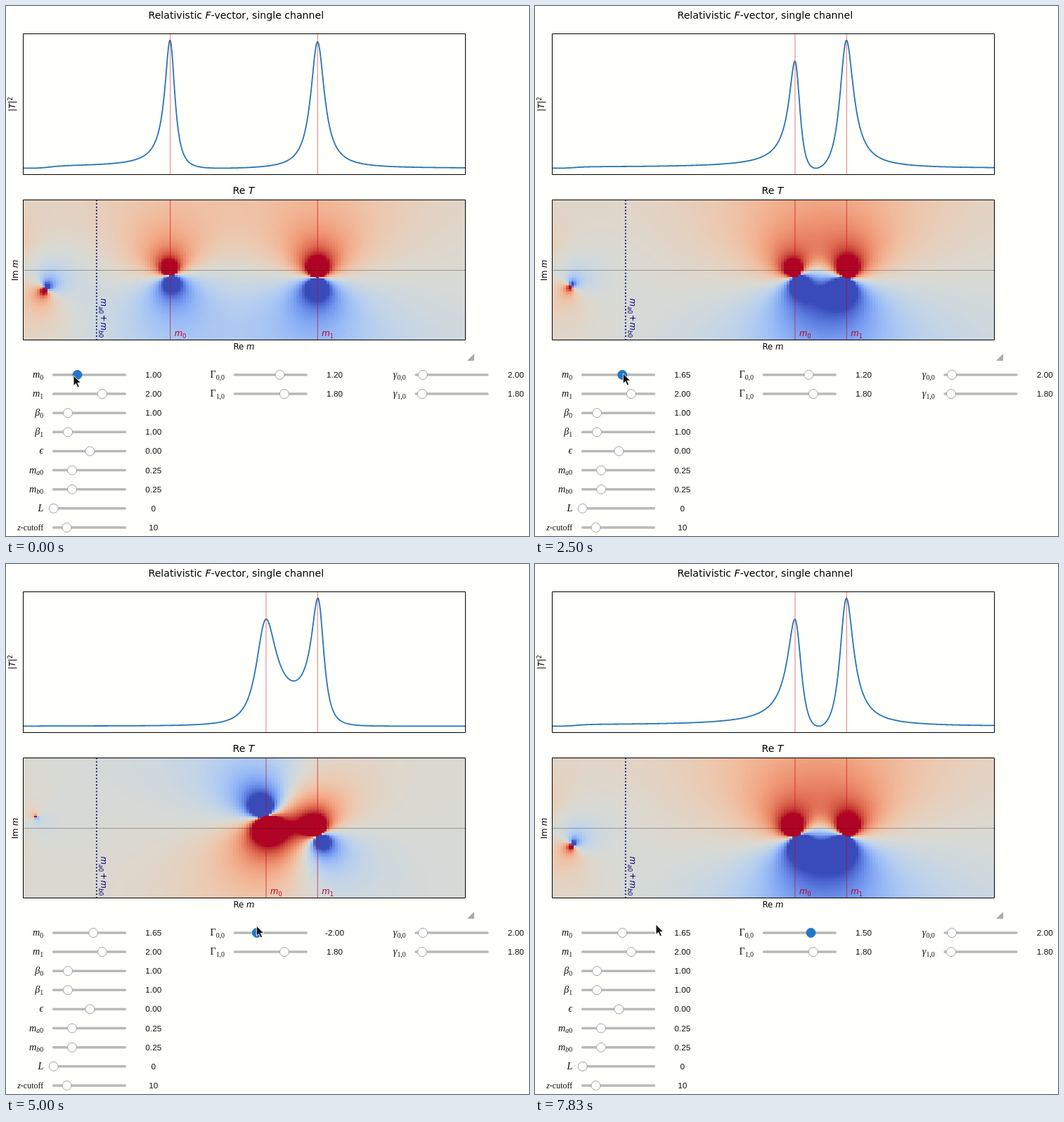
Recreate the animation shown at these times as an HTML page with a canvas. Size 744 px wide and 753 px high, loop 8000 ms.

```html
<!DOCTYPE html>
<html lang="en">
<head>
<meta charset="utf-8">
<title>F-vector explorer</title>
<style>
html, body { margin: 0; width: 744px; height: 753px; overflow: hidden; background: #fffffc; }
canvas, svg { position: absolute; left: 0; top: 0; }
text { white-space: pre; }
.plot { font-family: "DejaVu Sans", sans-serif; font-size: 11.75px; }
.title { font-size: 14.1px; }
.label { font-family: "Liberation Serif", serif; font-size: 14.2px; fill: #111; }
.value { font-family: "Liberation Sans", sans-serif; font-size: 11.8px; fill: #111; }
.it { font-style: italic; }
.sub { font-size: 70%; }
</style>
</head>
<body>
<canvas id="stage" width="744" height="753"></canvas>
<svg id="ui" width="744" height="753"></svg>
<script>
const LOOP = 8000;
const LEFT = 24, WIDTH = 629, TOP = 39.5, TOP_H = 200, LOW = 275.5, LOW_H = 199;
const MASS_MAX = 3, M1 = 2, THRESHOLD = 0.5, CUTOFF = 10;
const COLS = 160, ROWS = 80, SAMPLES = 600;

// ---- motion, in ticks of a sixth of a second ----
const IDLE = [9, 11, 12, 31, 32, 44, 46];
const LAG = 2.5; // the plots trail the sliders

const mix = (a, b, u) => a + (b - a) * u;
const ramp = (k, a, b) => Math.max(0, Math.min(1, (k - a) / (b - a)));
const out = u => u * (2 - u);
const smooth = u => u * u * (3 - 2 * u);
const snap = (v, step) => Math.round(v / step) * step;

const massAt = k => snap(1 + 0.53 * out(ramp(k, 2, 8)) + 0.12 * out(ramp(k, 10.5, 12.5)), 0.01);
const widthAt = k => snap(1.2 - 3.5 * ramp(k, 20.7, 27) + 0.3 * ramp(k, 28, 30)
  + 3.5 * smooth(ramp(k, 32.1, 41.5)), 0.1);
const massKnob = m => 66.5 + 35 * m;
const widthKnob = g => 377.2 + 10.2 * g;

function pointerAt(k) {
  const travel = smooth(ramp(k, 15, 20)), leave = smooth(ramp(k, 43, 47));
  const grab = mix(-5.5, 1, ramp(k, 2, 5));
  const dragged = mix(massKnob(massAt(k)) + grab, widthKnob(widthAt(k)) - 0.5, travel);
  const y = 525 - 3 * ramp(k, 2, 8) + 23 * Math.sin(Math.PI * travel) - 8 * smooth(ramp(k, 22, 30));
  return [mix(dragged, 172, leave), y - 2 * leave];
}

function tickAt(t) {
  let k = Math.floor(t * 0.006 + 1);
  while (k > 0 && Math.round(k * 100 / 6) * 10 > t) k--;
  while (IDLE.includes(k)) k--;
  return k;
}

// ---- amplitude ----
const rho = m => Math.sqrt(m * m / 4 - 0.0625) / (8 * Math.PI * m);
const pole = (m, width, g) => ({ m2: m * m, a: g * m * width, r: g * g * width * m / rho(m) });

function amplitude(x, y, poles) {
  const sr = x * x - y * y, si = 2 * x * y, s2 = sr * sr + si * si, c = 64 * Math.PI ** 2;
  const qr = (0.25 - 0.0625 * sr / s2) / c, qi = 0.0625 * si / s2 / c;
  let pr = 0, pi = 0, kr = 0, ki = 0;
  for (const p of poles) {
    const d = p.m2 - sr, n = d * d + si * si || 1e-12;
    pr += p.a * d / n; pi += p.a * si / n;
    kr += p.r * d / n; ki += p.r * si / n;
  }
  const dr = 1 + qr * ki + qi * kr, di = qi * ki - qr * kr, n = dr * dr + di * di;
  return [(pr * dr + pi * di) / n, (pi * dr - pr * di) / n];
}

// ---- diverging blue-red map, interpolated in polar Lab space ----
function coolwarm(u) {
  const side = Math.abs(2 * u - 1), s = 1.08 * side, m = mix(88, 80, side);
  const h = u < 0.5 ? mix(-1.661, -1.1, side) : mix(1.061, 0.5, side);
  const fy = (m * Math.cos(s) + 16) / 116;
  const cube = f => f > 6 / 29 ? f ** 3 : (f - 4 / 29) * 108 / 841;
  const x = 0.9505 * cube(fy + m * Math.sin(s) * Math.cos(h) / 500);
  const y = cube(fy), z = 1.089 * cube(fy - m * Math.sin(s) * Math.sin(h) / 200);
  const gamma = c => c > 0.0031308 ? 1.055 * c ** (1 / 2.4) - 0.055 : 12.92 * Math.max(0, c);
  const rgb = [3.2406 * x - 1.5372 * y - 0.4986 * z, 1.8758 * y - 0.9689 * x + 0.0415 * z,
    0.0557 * x - 0.204 * y + 1.057 * z];
  const tint = [0.975, 0.985, 0.96];
  return rgb.map((c, i) => 255 * tint[i] * Math.min(1, gamma(c)));
}
const PALETTE = Array.from({ length: 256 }, (_, i) => coolwarm(i / 255));

// ---- plots ----
const ctx = document.getElementById("stage").getContext("2d");
const heat = document.createElement("canvas");
heat.width = COLS; heat.height = ROWS;
const hctx = heat.getContext("2d");
const px = m => LEFT + m / MASS_MAX * WIDTH;

function drawHeat(poles) {
  const img = hctx.createImageData(COLS, ROWS);
  for (let j = 0, o = 0; j < ROWS; j++) for (let i = 0; i < COLS; i++, o += 4) {
    const z = amplitude((i + 0.5) / COLS * MASS_MAX, 0.5 - (j + 0.5) / ROWS, poles)[1];
    img.data.set(PALETTE[Math.round(255 * ramp(z, -CUTOFF, CUTOFF))], o);
    img.data[o + 3] = 255;
  }
  hctx.putImageData(img, 0, 0);
  ctx.imageSmoothingEnabled = false;
  ctx.drawImage(heat, LEFT, LOW, WIDTH, LOW_H);
}

function line(x1, y1, x2, y2, color, width, dash = []) {
  ctx.strokeStyle = color;
  ctx.lineWidth = width;
  ctx.setLineDash(dash);
  ctx.beginPath();
  ctx.moveTo(x1, y1);
  ctx.lineTo(x2, y2);
  ctx.stroke();
  ctx.setLineDash([]);
}

function drawCurve(poles) {
  const mass = i => Math.max(1e-3, i / (SAMPLES - 1) * MASS_MAX);
  const values = Array.from({ length: SAMPLES }, (_, i) => Math.hypot(...amplitude(mass(i), 0, poles)) ** 2);
  const lo = Math.min(...values), hi = Math.max(...values);
  // a margin of 5 % of the data range above and below
  const py = v => TOP + TOP_H * (1.05 - ramp(v, lo, hi)) / 1.1;
  ctx.strokeStyle = "#2575b2";
  ctx.lineWidth = 1.8;
  ctx.lineJoin = "round";
  ctx.beginPath();
  values.forEach((v, i) => ctx.lineTo(px(mass(i)), py(v)));
  ctx.stroke();
}

function drawPlots(m0, g0) {
  const poles = [pole(m0, g0, 2), pole(M1, 1.8, 1.8)];
  ctx.clearRect(0, 0, 744, 753);
  drawCurve(poles);
  drawHeat(poles);
  line(LEFT, 375.5, LEFT + WIDTH, 375.5, "rgba(0,0,0,.6)", 1, [1, 1]);
  line(px(THRESHOLD), LOW, px(THRESHOLD), LOW + LOW_H, "#00007c", 1.8, [1.8, 2.9]);
  for (const m of [m0, M1]) {
    line(px(m), TOP, px(m), TOP + TOP_H, "rgba(220,25,45,.5)", 1.2);
    line(px(m), LOW, px(m), LOW + LOW_H, "rgba(210,0,25,.65)", 1);
  }
  ctx.strokeStyle = "#000";
  ctx.lineWidth = 1;
  ctx.strokeRect(24.5, TOP, WIDTH, TOP_H);
  ctx.strokeRect(24.5, LOW, WIDTH, LOW_H);
}

// ---- labels ----
const ui = document.getElementById("ui");

function add(tag, attrs, markup = "") {
  const el = document.createElementNS("http://www.w3.org/2000/svg", tag);
  for (const k in attrs) el.setAttribute(k, attrs[k]);
  el.innerHTML = markup;
  return ui.appendChild(el);
}
const it = s => `<tspan class="it">${s}</tspan>`;
const sub = s => `<tspan class="sub" dy="2.5">${s}</tspan>`;
const text = (x, y, cls, anchor, markup, more) =>
  add("text", { x, y, class: cls, "text-anchor": anchor, ...more }, markup);
const turned = (x, y, angle, anchor, markup, fill = "#000") =>
  text(0, 0, "plot", anchor, markup, { transform: `translate(${x} ${y}) rotate(${angle})`, fill });

text(327.3, 18, "plot title", "middle", `Relativistic ${it("F")}-vector, single channel`);
text(338, 267, "plot title", "middle", `Re ${it("T")}`);
text(338.5, 488, "plot", "middle", `Re ${it("m")}`);
turned(13, 139.5, -90, "middle", `|${it("T")}|<tspan class="sub" dy="-4.5">2</tspan>`);
turned(16.5, 375.5, -90, "middle", `Im ${it("m")}`);
turned(134.5, 415.5, 90, "start", it("m") + sub(it("a") + "0")
  + `<tspan dy="-2.5">\u200a+\u200a</tspan>` + it("m") + sub(it("b") + "0"), "#00007c");
const poleLabels = [0, 1].map(i => text(0, 469, "plot", "start", it("m") + sub(i), { fill: "#c00028" }));
const placeLabel = (i, m) => poleLabels[i].setAttribute("x", px(m) + 6);
placeLabel(1, M1);
add("path", { d: "M666 494V504H656Z", fill: "#ababab" });

// ---- sliders ----
function slider(col, row, markup, value, share) {
  const x = 66 + 257.75 * col, y = 524 + row * 27.12;
  text(x - 12.7, y + 4, "label", "end", markup);
  add("rect", { x, y: y - 1.75, width: 105, height: 3.5, rx: 1.5, fill: "#b9b9b7" });
  const knob = add("circle", { cx: x + 105 * share, cy: y, r: 6.5, fill: "#fff", stroke: "#a3a3a3" });
  const label = text(x + 143.8, y + 4, "value", "middle", value);
  return (v, cx, active) => {
    label.textContent = v.toFixed(2).replace("-0.00", "0.00");
    knob.setAttribute("cx", cx);
    knob.setAttribute("fill", active ? "#2676c6" : "#fff");
    knob.setAttribute("stroke", active ? "#2676c6" : "#a3a3a3");
  };
}

const setMass = slider(0, 0, it("m") + sub(0), "1.00", 1 / 3);
slider(0, 1, it("m") + sub(1), "2.00", 0.675);
for (const i of [0, 1]) slider(0, 2 + i, it("β") + sub(i), "1.00", 0.21);
slider(0, 4, it("ϵ"), "0.00", 0.508);
["a", "b"].forEach((p, i) => slider(0, 5 + i, it("m") + sub(it(p) + "0"), "0.25", 0.267));
slider(0, 7, it("L"), "0", 0.016);
slider(0, 8, `<tspan font-size="12">${it("z")}-cutoff</tspan>`, "10", 0.195);
const setWidth = slider(1, 0, "Γ" + sub("0,0"), "1.20", 0.628);
slider(1, 1, "Γ" + sub("1,0"), "1.80", 0.687);
slider(2, 0, it("γ") + sub("0,0"), "2.00", 0.11);
slider(2, 1, it("γ") + sub("1,0"), "1.80", 0.1);
const pointer = add("path", {
  d: "M0 0V14.5L3.4 11.4L6 17L8.4 16L5.9 10.5H10.5Z",
  fill: "#111", stroke: "#fff", "stroke-width": 0.9
});

// ---- playback ----
let shown = -1, drawn = "";

function show(k) {
  const m = massAt(k), g = widthAt(k), pm = massAt(k - LAG), pg = widthAt(k - LAG);
  if (drawn !== pm + "/" + pg) {
    drawn = pm + "/" + pg;
    drawPlots(pm, pg);
    placeLabel(0, pm);
  }
  setMass(m, massKnob(m), k < 20);
  setWidth(g, widthKnob(g), k >= 20);
  pointer.setAttribute("transform", `translate(${pointerAt(k)})`);
}

const start = performance.now();
function frame() {
  const k = tickAt((performance.now() - start) % LOOP);
  if (k !== shown) show(shown = k);
  requestAnimationFrame(frame);
}
frame();
</script>
</body>
</html>
```
